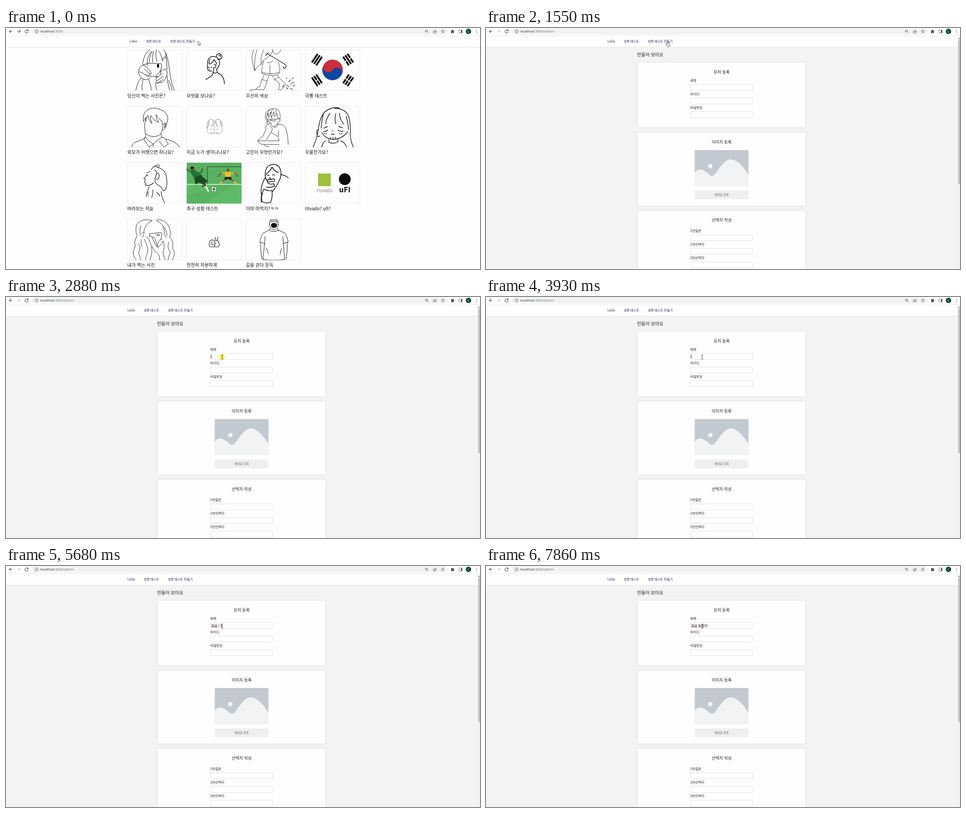
Recreate the animation shown at these times as an HTML page. Size 1048 by 534 pixels, loop 8 s.

```html
<!DOCTYPE html>
<html lang="ko">
<head>
<meta charset="utf-8">
<title>성향 테스트</title>
<style>
  html, body { margin: 0; width: 100%; height: 100%; overflow: hidden; background: #fff; }
  #stage { display: block; width: 1048px; height: 534px; }
  text { font-family: "Noto Sans CJK KR", "Noto Sans CJK", "Noto Sans", sans-serif; white-space: pre; }
  .url { font: 7.43px "Open Sans", "Noto Sans", sans-serif; }
  .nav text { fill: #2d1566; }
  .mid { text-anchor: middle; }
  .ink, .icon { fill: none; stroke-linecap: round; stroke-linejoin: round; }
  .icon { stroke: #50545a; stroke-width: 1.1; }
  .thin { stroke-width: .75; }
</style>
</head>
<body>
<svg id="stage" viewBox="0 0 1048 534">
  <rect width="1048" height="534" fill="#fefefe"/>

  <g id="listPage"></g>
  <g id="formPage"></g>

  <g id="browser">
    <rect width="1048" height="17" fill="#fff"/>
    <rect x="56" y="0" width="920" height="15" rx="7.5" fill="#f1f3f4"/>
    <path d="M0 17.5H1048" stroke="#e6e8ea"/>
    <path class="icon" d="M14 7.5H7.5M10.5 4.3L7.3 7.5L10.5 10.7"/>
    <path class="icon" id="forward" d="M25 7.5H31.5M28.5 4.3L31.7 7.5L28.5 10.7"/>
    <path class="icon" d="M48.6 5.8A3.6 3.6 0 1 0 49 8.6M49 3.8V6.3H46.4"/>
    <circle class="icon thin" cx="67.5" cy="7.5" r="3.6"/>
    <path class="icon thin" d="M67.5 7.2V9.5M67.5 5.4V5.5"/>
    <text class="url" x="76" y="10.2" fill="#26282c">localhost<tspan id="path" fill="#6a6e74">:3000</tspan></text>
    <g class="icon thin">
      <circle cx="929.5" cy="6.8" r="2.6"/>
      <path d="M931.5 8.8L934 11.3M928.4 6.8H930.6"/>
      <path d="M946.5 6H944.8V11H951V9.5M946.8 9Q947 6 950 6V4.2L952.4 6.6L950 8.8V7.4Q948 7.2 946.8 9Z"/>
      <path d="M965.7 3.9L966.8 6.4L969.5 6.6L967.4 8.4L968.1 11L965.7 9.6L963.3 11L964 8.4L961.9 6.6L964.6 6.4Z"/>
      <rect x="1002" y="4.4" width="6.6" height="6.6"/>
    </g>
    <path d="M984 5H986Q986.9 2.6 987.9 5H990.2V7.2Q992.6 8 990.2 9V11.4H987.9Q987 9.6 986 11.4H984V9Q985.8 8 984 7.2Z M1006 4.4H1008.6V11H1006Z" fill="#50545a"/>
    <circle cx="1022.5" cy="7.5" r="6" fill="#0a4f3c"/>
    <text class="mid" x="1022.5" y="9.7" font-size="6" fill="#fff">L</text>
    <path d="M1040.5 4.6v0M1040.5 7.6v0M1040.5 10.6v0" stroke="#50545a" stroke-width="1.6" stroke-linecap="round"/>
  </g>

  <circle id="glow" r="6.6" fill="#fff200" fill-opacity=".72"/>
  <g id="pointer" stroke-linejoin="round">
    <path id="arrow" d="M0 0V9.5L2.2 7.4L3.6 10.7L5 10.1L3.6 6.9H6.4Z" fill="#fff" stroke="#222" stroke-width=".7"/>
    <path id="hand" d="M-1 .6Q0 -.8 1 .6V4.6L4.5 5.6Q5.6 6 5.3 8L4.5 12H-.5L-3 8.2Q-4 6.5 -2.6 6.4L-1 7.6Z" fill="#fff" stroke="#222" stroke-width=".8"/>
    <path id="beam" d="M-2 -4.5H-.6L0 -4L.6 -4.5H2M0 -4V4M-2 4.5H-.6L0 4L.6 4.5H2" fill="none" stroke="#333" stroke-width=".9"/>
  </g>
</svg>

<script>
const LOOP = 8000;
const $ = id => document.getElementById(id);
const rect = (x, y, w, h, attrs) => `<rect x="${x}" y="${y}" width="${w}" height="${h}" ${attrs}/>`;
const text = (x, y, size, str, attrs = "") => `<text x="${x}" y="${y}" font-size="${size}" ${attrs}>${str}</text>`;
const shape = (fill, d) => `<path fill="${fill}" d="${d}"/>`;
const limb = (color, width, d) => `<path class="ink" stroke="${color}" stroke-width="${width}" d="${d}"/>`;
const ink = (width, ...paths) => paths.map(d => limb("#141414", width, d)).join("");
const dot = (x, y, r, fill) => `<circle cx="${x}" cy="${y}" r="${r}" fill="${fill}"/>`;

const nav = (dx, attrs) => `<g class="nav" transform="translate(${dx})">
  ${rect(-20, 18, 1100, 24, 'fill="#fefefe"')}<path d="M-20 42.5H1080" stroke="#e4e4e4"/>
  ${text(273.5, 32.2, 6.9, "LoGo")}${text(309.5, 32.2, 6.9, "성향 테스트")}${text(362.8, 32.2, 6.9, "성향 테스트 만들기", attrs)}</g>`;

// Three bars; each digit is 1 for solid, 0 for split.
function trigram(x, y, angle, bars) {
  const rows = [...bars].map((bar, i) => {
    const top = (i - 1) * 5.75 - 1.9;
    return bar === "1" ? rect(-11.5, top, 23, 3.8, "")
      : rect(-11.5, top, 10.5, 3.8, "") + rect(1, top, 10.5, 3.8, "");
  });
  return `<g transform="translate(${x} ${y}) rotate(${angle})">${rows.join("")}</g>`;
}

const flag = () => `<g transform="translate(722 93) rotate(33.7)">${dot(0, 0, 22.7, "#0f47a0")}
  ${shape("#cd2e3a", "M-22.7 0A22.7 22.7 0 0 1 22.7 0A11.35 11.35 0 0 0 0 0A11.35 11.35 0 0 1 -22.7 0")}</g>` +
  trigram(687.5, 70, -56.3, "111") + trigram(756.5, 116, -56.3, "000") +
  trigram(756.5, 70, 56.3, "010") + trigram(687.5, 116, 56.3, "101");

function pitch() {
  let net = "";
  for (let x = 450; x < 560; x += 5) net += `M${x} 309l-38 38M${x - 40} 309l38 38`;
  return rect(399.6, 298, 121, 91, 'rx="2" fill="#56b05e"') + shape("#5ebb65", "M399.6 347H520.6V387Q520.6 389 518.6 389H401.6Q399.6 389 399.6 387Z") +
    shape("#58b360", "M400 372L470 347H505L440 389H401Z") +
    `<svg x="446" y="308" width="74.6" height="39" viewBox="446 308 74.6 39">${limb("#68bd70", .45, net)}</svg>` +
    limb("#245f31", 1.4, "M445.5 347V307.5H520") + limb("#f2faf1", 1.5, "M400 346.5H520") +
    limb("#8a5a3c", 2.8, "M484 321L474 323L469 329M498 321L508 323L513 329M486 335L479 339L475 344M496 335L503 339L508 344") +
    limb("#f0b92c", 3.2, "M485 321L479 322M497 321L503 322M477 341L474 345M505 341L509 345") +
    shape("#f2bd2e", "M484 319H498L497 331H485Z") + shape("#222", "M484 330H498L499 336H493L491 333L489 336H483Z") +
    dot(491, 316, 2.8, "#8a5a3c") + limb("#222", 1.6, "M489 314Q491 312 493 314") +
    limb("#6b432f", 3, "M408 318L400 313M426 323L432 320L434 313") +
    limb("#75503f", 3.6, "M426 342L440 346L434 351") +
    limb("#f6f6f6", 3.6, "M441 349L447 361") + limb("#6b432f", 3.6, "M437 342L441 349") +
    limb("#2b8a3d", 4.6, "M410 319L404 316M424 322L430 321") +
    shape("#1f7434", "M407 318L417 314L434 327L429 338L417 335Z") +
    shape("#164c26", "M416 332L430 326L446 339L438 346L427 341L419 347Z") +
    dot(412, 312, 4, "#6b432f") + shape("#1b1b1b", "M407.5 312Q407 305.5 415 307.5L416.5 311L411 311Z") +
    dot(459.5, 357.4, 5, "#fff") + shape("#222", "M457.5 356L460 354.5L462 356.5L461 359.5L458 359.5ZM454.7 356l1.6 1.4-1 2.2ZM464.3 356l-1.5 1 .8 2.6ZM458 352.6h3l-1 1.2ZM457 361l2 1h2l-.6-1Z");
}

const badges = () => rect(690, 322.5, 28, 28, 'fill="#9fc03b"') + dot(749, 335, 13, "#0b0b0b") +
  text(704, 363.6, 9.2, "TILVADO", 'class="mid" fill="#777"') +
  text(749, 364, 16, "uFI", 'class="mid" font-weight="700" fill="#0b0b0b"');

const cards = [
  ["당신이 찍는 사진은?", ink(1,
    "M318 48Q305 56 302 80M312 79Q312 62 321 52M323 52Q316 66 317 76M333 48Q329 60 334 74M338 51Q344 60 346 74M349 48Q358 60 361 90Q364 118 372 138M353 56Q356 76 356 92M345 69L353 62M347 71L354 65M326 51Q323 64 324 76",
    "M314 78L342 79Q344.5 79 344 82L341 102M314 78L312 84M308 102L314 106L336 108M294 92Q296 84 303 82L313 79M303 82L310 86Q318 93 321 99Q322 104 317 101L306 91M294 92Q291 98 296 106Q300 113 306 114Q314 116 320 109M295 97Q303 98 313 109M317 101Q318 105 314 107M298 111Q290 122 287 138M315 114Q321 126 321 138",
    "M341 98Q347 90 354 92Q358 97 355 106Q352 115 346 120L333 122M342 94L333 104Q329 110 334 110L346 100M334 110Q329 117 334 117L348 107M333 117Q328 122 334 123L347 114M356 106Q357 122 362 138M303 114Q300 124 301 138M330 124L333 138M360 116Q365 126 367 138") +
    rect(334, 79.5, 4.4, 8.4, 'rx="2"')],
  ["무엇을 보나요?", ink(1.5,
    "M464 64Q454 61 449 67Q445 72 446 78M468 66Q473 72 472 80Q470 88 465 92M466 66Q463 58 470 57Q473 55 474 59Q479 61 477 66Q474 71 468 69M470 61Q474 59 474 64",
    "M451 69Q448 76 450 80Q457 78 460 70Q464 74 466 80M446 78L445 86L446 92Q448 97 455 95M460 81Q464 79 464 84Q463 89 459 88M459 89Q459 95 458 98M447 87L450 88M453 87L455 87M449 92L451 92M458 98L457 103Q452 109 442 114M466 92L467 98L470 101Q482 105 483 124M458 98Q462 102 467 98")],
  ["우산의 색상", ink(.8,
    "M548 48Q541 62 546 80L550 95Q554 85 564 81Q566 72 576 67Q586 61 591 48M555 48Q548 68 550 95M570 48Q562 62 564 81M588 48Q590 57 598 58Q606 56 607 48M570 73Q566 84 565 100Q580 107 600 104Q607 101 605 86L602 76M590 72Q584 80 577 76M566 98Q582 104 604 99M584 82Q582 92 584 102",
    "M571 104L567 113Q562 122 561 130Q553 133 553 136L570 137Q575 128 577 118L581 106M565 114L577 117M589 106L594 114L604 122Q606 130 602 136L608 137Q617 130 618 124L606 112L601 105M592 116L602 109M538 138L553 136") +
    ink(1.4, "M578 57L616 80M574 61L577 57L580 55M616 80Q622 85 617 89Q613 90 613 86") +
    ink(1.2, "M614 126l-2 5M621 127l5 3M625 119l4 -4M631 122l6 -1M620 132l3 3M635 129l3 -3M628 134l6 2") +
    limb("#333", .8, "M634 110a1.5 1.5 0 1 0 .1 0M620 110a1 1 0 1 0 .1 0M629 124a1 1 0 1 0 .1 0")],
  ["국뽕 테스트", flag()],
  ["외모가 어땟으면 하나요?", ink(1,
    "M304 207Q301 189 312 182Q323 174 340 180Q356 185 358 200Q357 212 350 221L352 211M304 207L309 198L309 208Q309 198 314 193Q315 204 323 212Q318 202 320 194Q327 206 338 209Q331 202 332 192Q337 202 344 205L347 214M347 214L346 225M307 209Q306 224 308 234Q316 240 326 241Q336 240 342 235L346 225M347 214Q354 207 354 215Q353 224 347 226",
    "M309 236L308 242Q303 248 288 252Q280 255 278 264M308 242L305 248L317 264L325 257Q314 250 308 242M343 235L344 242L325 257M344 242L350 243L359 257L349 264L339 251M353 246Q376 251 384 264M326 258L325 264")],
  ["지금 누가 생각나나요?", limb("#777", .7,
    "M449 212Q443 222 445 231Q448 235 460 233M462 233Q474 236 477 231Q480 222 474 211M447 213Q446 204 452 203Q459 202 461 209Q462 214 458 216M452 203Q443 206 444 222Q449 216 450 207M457 203Q460 208 454 218Q456 220 461 209M475 213Q476 203 470 202Q463 201 461 209M470 202Q479 206 479 218Q474 215 473 207M465 203Q461 210 467 219Q469 218 464 207M461 216V233M451 225Q455 222 458 226M471 225Q467 222 464 226M452 234Q453 230 458 233M470 234Q469 230 464 233")],
  ["고민이 무엇인가요?", limb("#333", 1,
    "M575 204Q570 190 579 183Q590 175 601 181Q609 189 605 203M576 200L579 188L581 198L585 186L587 199L592 186L594 196L599 190L602 201M584 181Q578 186 577 194M590 180Q586 184 586 190M597 182Q596 188 599 192M578 201L577 209M602 201Q607 199 606 205Q604 210 601 209L599 214Q594 219 588 218M578 202h7v4h-7zM588 202h7v4h-7zM585 203h3M602 201L595 203") + limb("#333", 1,
    "M586 210L578 214Q573 216 575 224L568 240L557 249M578 214Q575 210 579 207Q583 207 582 212M586 210Q589 213 584 217L588 221Q590 227 584 234Q578 244 575 250L556 250M599 213Q616 211 620 226Q624 242 624 258M603 228Q600 240 604 250L578 250M592 220Q599 221 603 213M586 231L600 240M556 250Q559 258 570 258L604 258M570 258Q573 263 582 263")],
  ["우울한가요?", ink(1.4,
    "M737 177Q715 174 702 189Q693 203 691 222Q688 244 679 264M727 178Q751 178 758 197Q763 216 761 238Q763 254 768 264M702 189Q697 210 697 222M716 189Q707 202 707 213M729 190Q726 202 729 212M737 189Q739 205 747 213M752 196Q757 212 757 226M691 224Q684 228 689 240Q692 241 694 239M698 231Q704 244 722 247Q744 246 755 230",
    "M702 229Q707 231 711 226M734 226Q739 231 745 228M703 222L711 218M735 218L744 221M721 228h1.5M719 236Q722 234 726 236M714 247V253M734 246V252M706 250Q700 254 698 264M740 250Q750 254 753 264M714 253Q724 258 734 252M717 242l1 4M723 242v5M728 242l1 4M704 233l0 2M708 233l0 2M738 233v2M742 233v2")],
  ["바라보는 하늘", ink(1.2,
    "M340 304Q333 302 329 306Q333 309 340 307M329 306Q324 309 321 314M335 309Q350 312 354 326Q357 340 355 352Q352 360 348 361M328 314Q335 317 332 326Q328 334 330 342Q334 348 342 351Q345 357 348 361M333 321Q341 322 338 332Q335 338 332 334M319 318L311 321M314 326L311 327M312 325Q308 331 305 333Q306 336 310 336M307 338Q305 340 308 342Q307 347 312 349Q319 350 326 343M317 352Q311 362 310 374M315 363Q312 368 315 372M325 358Q325 368 322 376M343 362Q344 376 351 388M333 364Q338 368 340 372")],
  ["축구 성향 테스트", pitch()],
  ["이따 머먹지?ㅋㅋ", ink(1.6,
    "M581 305Q595 298 604 308Q611 319 606 334Q599 350 589 363M607 325Q616 325 624 332M579 306Q573 313 573 325M581 318Q587 313 588 308Q594 319 603 320M573 325Q573 334 578 339M573 332Q561 352 565 370M578 327Q580 325 582 327M589 326Q591 324 594 326M581 319Q577 321 575 325",
    "M577 338Q582 333 586 336L592 334Q596 337 592 340L581 341Q577 340 577 338M578 342Q582 348 592 345L594 350Q583 355 576 352M586 336L583 331M570 357Q580 362 588 360Q590 374 585 386M570 357Q563 374 566 384Q573 390 585 386M566 366Q563 378 565 386")],
  ["tilvado? ufi?", badges()],
  ["내가 찍는 사진", ink(.9,
    "M323 427Q302 420 290 434Q284 446 290 460Q286 468 284 476Q288 484 282 492Q279 504 288 514M333 425Q351 423 359 438Q366 450 362 464Q372 472 368 488Q377 498 368 514M323 427Q307 434 305 450Q306 456 302 464M333 427Q349 434 350 450Q349 456 354 464M304 452l-4 4M349 440Q355 448 356 460M298 438Q294 450 298 460",
    "M317 456L341 453Q344 453 344 456L343 470M317 456L318 462M334 457h5v3h-5zM316 462Q320 458 323 464L332 484M323 464Q328 462 330 468L335 486M310 462Q317 466 320 480L330 496M306 468Q311 478 314 492L308 514M342 468Q334 474 335 486Q344 482 347 472M348 472Q352 486 347 498L352 514M322 484Q324 500 318 514M331 496Q340 500 340 514M293 478Q300 486 293 498L298 514M360 474Q355 486 363 496L358 514M300 468Q296 476 301 484")],
  ["천천히 차분하게", ink(1.1,
    "M450 484Q447 474 453 470Q462 468 462 477Q458 482 454 478Q452 474 457 474M450 485H470Q473 480 470 474Q468 469 463 471M462 470Q464 466 462 464M467 470L469 463M465 474v.6M469 474v.6M462 477Q463 482 460 484")],
  ["길을 걷다 문득", ink(1,
    "M583 436Q580 424 592 422.5Q605 424 601 436M584 428Q592 423 601 428M585 431Q592 426 600 431M583 434Q580 436 584 440M601 434Q604 436 601 440M584 440Q586 447 592 447Q598 447 601 440M584 444L582 448Q592 454 602 448L601 444",
    "M582 448L569 454Q564 460 561 474L573 478M602 448L616 454Q621 460 624 474L612 478M573 462Q571 488 568 513M612 462Q614 488 616 513M568 513Q592 516 616 513M563 475Q562 494 566 512M622 475Q623 494 619 512M576 488L580 500M609 488L606 502") +
    shape("#0c0c0c", "M586 439Q585 432 592.5 432Q600 432 599 439Q596 444 592.5 442.5Q589 444 586 439Z")],
];

$("listPage").innerHTML = nav(0, 'id="makeLink"') + cards.map(([title, art], i) => {
  const x = 268 + (i % 4) * 131, y = 48 + Math.floor(i / 4) * 125.2;
  return rect(x + .5, y + .1, 121, 90.5, 'rx="2" fill="none" stroke="#e9e9e9"') +
    `<svg x="${x}" y="${y}" width="122" height="91" viewBox="${x} ${y} 122 91">${art}</svg>` +
    text(x + .3, y + 105.6, 10, title, 'font-weight="500" fill="#111"');
}).join("");

const panel = (y, h, title) => rect(334.5, y, 373, h, 'rx="4" fill="#fefefe" stroke="#dcdcdc"') +
  text(521, y + 25.3, 9, title, 'class="mid" font-weight="500" fill="#222"');
const field = (y, label) => text(451.6, y, 7.4, label, 'font-weight="500" fill="#222"') +
  rect(451.9, y + 6.3, 138, 13.2, 'rx="1" fill="#fff" stroke="#dcdcdc" stroke-width=".9"');
const fields = (y, ...labels) => labels.map((label, i) => field(y + i * 30.1, label)).join("");

$("formPage").innerHTML = rect(0, 43, 1048, 491, 'fill="#f3f3f3"') + nav(-4.8) +
  text(334, 62.8, 10, "만들어 보아요", 'font-weight="500" fill="#222"') +
  panel(75.8, 145, "유저 등록") + fields(118.9, "제목", "아이디", "비밀번호") +
  panel(230.8, 163.6, "이미지 등록") +
  rect(461.5, 270.5, 118.7, 79.3, 'fill="#c2c9d0"') + dot(496, 306, 5, "#f1f3f5") +
  shape("#f1f3f5", "M461.5 321C470 308 482 314 494 325Q500 331 506 324C517 310 528 291 541 291C556 292 569 307 580.2 325V349.8H461.5Z") +
  rect(461.5, 359.8, 118.7, 19.4, 'fill="#efefef"') +
  text(521, 371.9, 6.5, "썸네일 등록", 'class="mid" fill="#6c6464"') +
  panel(404, 160, "선택지 작성") + fields(452.2, "1번질문", "1번선택지", "2번선택지") +
  rect(1043, 18, 5, 516, 'fill="#f1f1f1"') + rect(1044, 27, 4, 319, 'fill="#c1c1c1"') +
  shape("#555", "M1044.3 24.5L1046 22L1047.7 24.5Z") +
  text(453.4, 134.6, 7.4, "", 'id="typed" fill="#222"') +
  `<path id="squiggle" class="ink" stroke="#e0262b" stroke-width=".7" d="M453.5 136${"l1 -1l1 1".repeat(7)}"/>` +
  rect(453.4, 128, .9, 8, 'id="caret" fill="#111"');

const typing = [[0, ""], [4670, "ㅇ"], [4730, "우"], [5020, "월"], [5280, "월ㅋ"], [5420, "월크"], [5480, "월클"],
  [5550, "월클 "], [5680, "월클 ㄷ"], [5750, "월클 도"], [5940, "월클 돌"], [6160, "월클 돌ㅂ"], [6340, "월클 돌벼"],
  [6410, "월클 돌별"], [6670, "월클 돌별ㅊ"], [6810, "월클 돌별차"], [6940, "월클 돌별찬"], [7330, "월클 돌별찬!"]];
const caretStates = [[0, false], [2880, true], [3400, false], [3930, true], [4470, false], [4670, true], [7860, false]];

const GLIDE_STEPS = 8;
const glide = Array.from({ length: GLIDE_STEPS }, (_, i) => {
  const p = (i + 1) / GLIDE_STEPS, s = p * p * (3 - 2 * p);
  const x = 401.5 + 75.5 * s, y = 29 + 104 * s;
  return [1610 + i * 67, [y < 36 ? "hand" : y < 126 ? "arrow" : "beam", x, y]];
});
const pointerStates = [[0, ["arrow", 424.5, 28.7]], [600, ["arrow", 420, 28.7]], [670, ["hand", 411, 29]],
  [740, ["hand", 404, 29]], [810, ["hand", 401.5, 29]], ...glide,
  [2280, ["beam", 477.5, 133.2]], [2350, ["beam", 478, 133.3]]];

const at = (states, t) => states.findLast(([start]) => start <= t)[1];
const within = (t, from, to) => t >= from && t < to;
const show = (id, on) => $(id).style.display = on ? "" : "none";

function draw(t) {
  const onForm = t >= 1550;
  show("listPage", !onForm);
  show("formPage", onForm);
  $("path").textContent = onForm ? ":3000/admin" : ":3000";
  $("forward").style.stroke = onForm ? "#c3c6ca" : "";

  const [kind, x, y] = at(pointerStates, t);
  for (const id of ["arrow", "hand", "beam"]) show(id, id === kind);
  $("pointer").setAttribute("transform", `translate(${x} ${y})`);

  const linkDown = within(t, 1480, 1550);
  $("makeLink").style.fill = linkDown ? "#f00" : "";
  show("glow", linkDown || within(t, 2880, 2940));
  $("glow").setAttribute("cx", x - .7);
  $("glow").setAttribute("cy", y - .5);

  const value = at(typing, t);
  if ($("typed").textContent !== value) $("typed").textContent = value;
  show("squiggle", value.includes(" "));
  show("caret", at(caretStates, t));
  const width = onForm && value ? $("typed").getComputedTextLength() : 0;
  $("caret").setAttribute("x", 453.3 + width);
}

let start;
function tick(now) {
  start ??= now;
  draw((now - start) % LOOP);
  requestAnimationFrame(tick);
}
draw(0);
requestAnimationFrame(tick);
</script>
</body>
</html>
```
